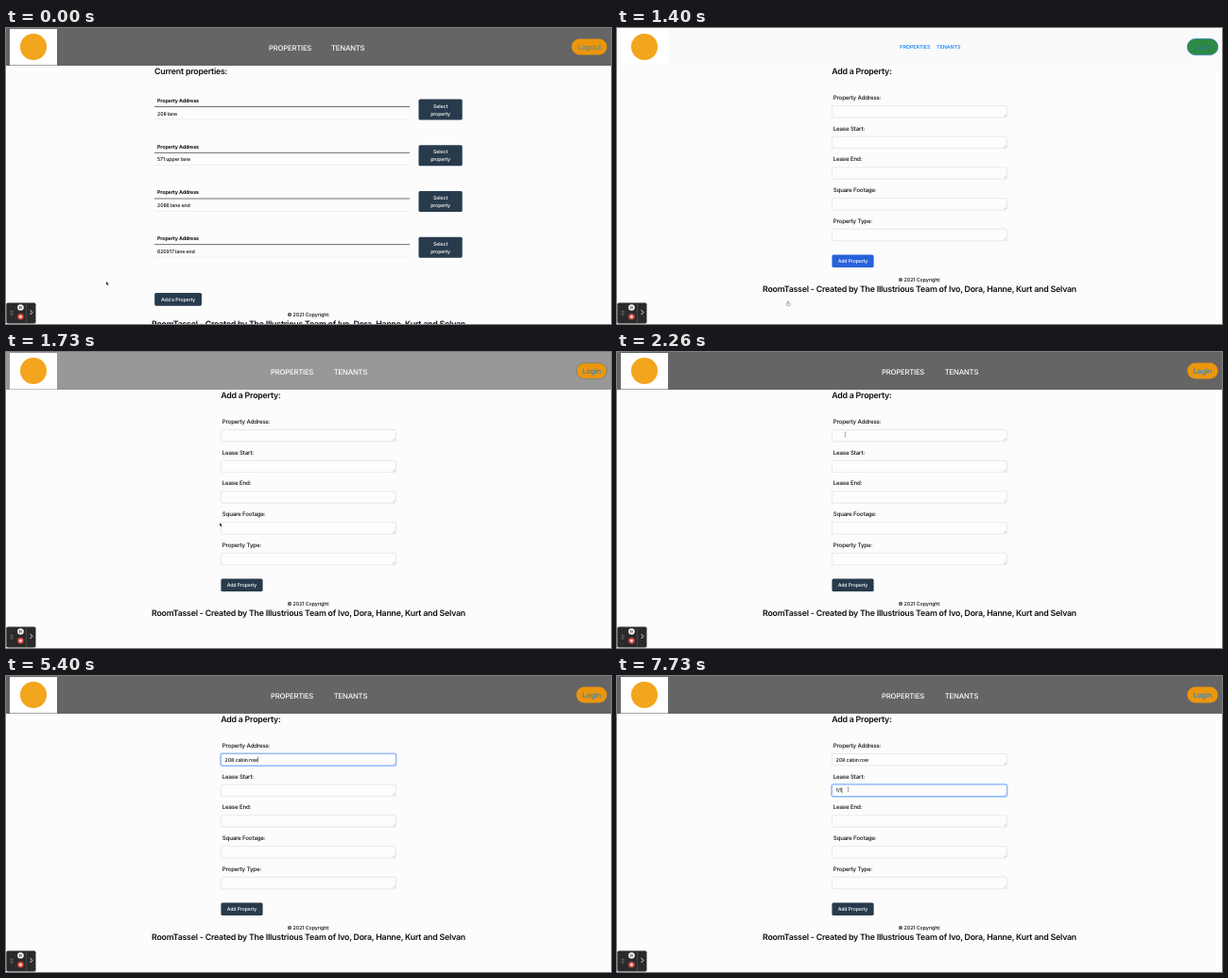
Write an HTML page that moves like this. It is 640 px wide and 314 px high and loops after 8 s.

```html
<!DOCTYPE html>
<html lang="en">
<head>
<meta charset="utf-8">
<title>Add a Property</title>
<style>
  html, body { margin: 0; width: 100%; height: 100%; overflow: hidden; background: #fcfcfd; }
  svg { display: block; width: 640px; height: 314px; }
  text {
    font-family: Inter, "Open Sans", sans-serif; font-weight: 500; letter-spacing: -.025em;
    fill: #0c0e10; white-space: pre; text-rendering: geometricPrecision;
  }
</style>
</head>
<body>
<svg id="stage" viewBox="0 0 640 314"></svg>
<script>
const LOOP = 8000, LOAD = 1400;
const DARK = '#283b4c', ORANGE = '#ec960c';
const stage = document.getElementById('stage');

function add(parent, tag, attrs, content) {
  const node = document.createElementNS('http://www.w3.org/2000/svg', tag);
  for (const k in attrs) node.setAttribute(k, attrs[k]);
  if (content) node.textContent = content;
  parent.appendChild(node);
  return node;
}
const group = parent => add(parent, 'g', {});
const text = (p, x, y, size, str, more) => add(p, 'text', { x, y, 'font-size': size, ...more }, str);
const rect = (p, x, y, width, height, fill, more) => add(p, 'rect', { x, y, width, height, fill, ...more });
const path = (p, d, more) => add(p, 'path', { d, fill: 'none', ...more });
const set = (node, attrs) => { for (const k in attrs) node.setAttribute(k, attrs[k]); };
const show = (node, on) => set(node, { visibility: on ? 'visible' : 'hidden' });
const mid = { 'text-anchor': 'middle' };
const white = { ...mid, style: 'fill:#fff' };
const bold = { style: 'font-weight:600' };

const clamp = v => Math.max(0, Math.min(1, v));
const ease = p => 1 - Math.pow(1 - clamp(p), 2);
function mix(a, b, p) {
  const part = (c, i) => parseInt(c.slice(1 + 2 * i, 3 + 2 * i), 16);
  return 'rgb(' + [0, 1, 2].map(i => Math.round(part(a, i) + (part(b, i) - part(a, i)) * p)) + ')';
}

// Property list page
const list = group(stage);
text(list, 157, 49.2, 8.8, 'Current properties:', bold);
['208 lane', '571 upper lane', '2086 lane end', '620917 lane end'].forEach((address, i) => {
  const y = 48.7 * i;
  text(list, 160, y + 78.9, 5.35, 'Property Address', { style: 'font-weight:700' });
  rect(list, 157, y + 83.2, 270, 0.8, '#4a4d50');
  text(list, 160, y + 92.6, 5.3, address);
  rect(list, 157, y + 96.7, 270, 0.5, '#dcdfe3');
  rect(list, 436.5, y + 75.6, 46.2, 22, DARK, { rx: 1.6 });
  text(list, 459.6, y + 84.6, 5.3, 'Select', white);
  text(list, 459.6, y + 92.6, 5.3, 'property', white);
});
rect(list, 157.2, 281, 49.8, 13.7, DARK, { rx: 1.6 });
text(list, 182.1, 289.8, 5.3, 'Add a Property', white);

// Form page
const form = group(stage);
text(form, 227.2, 49.2, 8.8, 'Add a Property:', bold);
const labels = ['Property Address:', 'Lease Start:', 'Lease End:', 'Square Footage:', 'Property Type:'];
const fields = labels.map((label, i) => {
  const y = 82.4 + 32.7 * i;
  text(form, 228.7, y - 6.5, 6.15, label);
  const glow = rect(form, 226.9, y - 0.3, 186, 13.2, 'none', { rx: 1.8, stroke: '#9cc3fb', 'stroke-width': 1.3 });
  const box = rect(form, 227.4, y + 0.1, 185, 12.4, '#fdfdfe', { rx: 1.4, 'stroke-width': 0.55 });
  path(form, `M409.3 ${y + 11.6}l2.2-2.2M410.6 ${y + 11.6}l.9-.9`, { stroke: '#777', 'stroke-width': 0.35 });
  const value = text(form, 231.6, y + 8.3, 5.3, '');
  return { y, glow, box, value };
});
const caret = rect(form, 0, 0, 0.5, 6, '#111');
const submit = rect(form, 227.4, 240.4, 44.2, 13.6, DARK, { rx: 1.6 });
text(form, 249.5, 249, 5.2, 'Add Property', white);

// Footer shared by both pages
const footer = group(stage);
text(footer, 320, 269, 5.4, '© 2021 Copyright:', mid);
text(footer, 320, 280.3, 8.8, 'RoomTassel - Created by The Illustrious Team of Ivo, Dora, Hanne, Kurt and Selvan',
  { ...mid, ...bold });

// Navigation bar
const bar = rect(stage, 0, 0, 640, 40, '#666666');
rect(stage, 4, 1, 50, 38.4, '#fff');
add(stage, 'circle', { cx: 29, cy: 20, r: 14, fill: '#f3a51d' });
const links = ['PROPERTIES', 'TENANTS'].map(s => text(stage, 0, 0, 7.7, s));
const pill = rect(stage, 603.3, 11.6, 32.4, 17, ORANGE, { rx: 8.5, stroke: '#2a78b0', 'stroke-width': 0.8 });
const account = text(stage, 0, 22.7, 7.7, '', mid);

// Screen recorder controls
const rec = group(stage);
rect(rec, 0.3, 291.6, 31.2, 21.8, '#2a2a2b', { rx: 1.6 });
for (let i = 0; i < 6; i++)
  rect(rec, 4.7 + (i % 2) * 1.8, 300 + (i >> 1) * 1.9, 0.8, 0.8, '#bbb');
add(rec, 'circle', { cx: 15.4, cy: 296.5, r: 3.3, fill: '#fff' });
path(rec, 'M14.6 295.1v2.8M16.2 295.1v2.8', { stroke: '#222', 'stroke-width': 0.8 });
add(rec, 'circle', { cx: 15.4, cy: 306.2, r: 3.3, fill: '#d9483f' });
rect(rec, 14.2, 305, 2.4, 2.4, '#fff', { rx: 0.5 });
rect(rec, 21.1, 292.5, 0.5, 20.4, '#606060');
path(rec, 'M25.6 299.2l2.3 2.4-2.3 2.4', { stroke: '#fff', 'stroke-width': 0.9 });

// Pointers, drawn around their hot spot
const pointers = {
  arrow: path(stage, 'M0 0V4.1L.95 3.3 1.6 4.8 2.3 4.5 1.65 3.1H2.9Z',
    { style: 'fill:#111', stroke: '#fff', 'stroke-width': 0.3 }),
  hand: path(stage, 'M-.5.4Q0-.3.5.4V2L2 2.4Q2.4 2.6 2.3 3.4L1.7 5.1H-.8L-2.1 3.2Q-1.7 2.4-.5 3.2Z',
    { style: 'fill:#fff', stroke: '#555', 'stroke-width': 0.45 }),
  beam: path(stage, 'M-.8-2.6Q0-2.6 0-2Q0-2.6.8-2.6M0-2V2M-.8 2.6Q0 2.6 0 2Q0 2.6.8 2.6',
    { stroke: '#555', 'stroke-width': 0.45 })
};
const route = [
  [60, 106, 268.7], [660, 181, 288], [1000, 181, 288], [1260, 181, 289.6], [1460, 181, 289.6],
  [1730, 226, 180.9], [2200, 241.4, 87.5], [2460, 241.4, 87.5], [3000, 244, 88.2],
  [5800, 244, 88.2], [6400, 244.5, 120.4]
];
function pointerAt(t) {
  const i = route.findIndex(k => k[0] > t);
  if (i < 0) return route[route.length - 1].slice(1);
  if (i === 0) return route[0].slice(1);
  const [t0, x0, y0] = route[i - 1], [t1, x1, y1] = route[i];
  const p = (t - t0) / (t1 - t0), s = p * p * (3 - 2 * p);
  return [x0 + (x1 - x0) * s, y0 + (y1 - y0) * s];
}

const entries = [
  { focus: 2460, str: '208 cabin row',
    keys: [3400, 3600, 3660, 3860, 4000, 4060, 4200, 4330, 4460, 4600, 4800, 5060, 5200] },
  { focus: 6400, str: '1/1', keys: [7060, 7200, 7400] }
];

function drawNav(t, onForm) {
  const age = t - LOAD, raw = onForm && age < 60;
  const fade = onForm ? ease(age / 800) : 1;
  const quick = onForm ? ease(age / 320) : 1;
  set(bar, { fill: mix('#fafafa', '#656565', fade) });
  const xs = raw ? [299, 338] : onForm ? [280, 346.8] : [278, 344];
  links.forEach((link, i) => {
    set(link, { x: xs[i], y: raw ? 21.9 : 23.7, 'font-size': raw ? 5.5 : 7.7 });
    link.style.fill = raw ? '#1680f0' : '#fff';
  });
  set(pill, {
    x: onForm ? 603.3 : 598.3, width: onForm ? 32.4 : 37.4,
    fill: mix('#2c8a42', ORANGE, quick),
    'stroke-opacity': onForm ? clamp(1 - age / 800) : 0
  });
  account.textContent = onForm ? 'Login' : 'Logout';
  set(account, { x: onForm ? 619.5 : 617.2 });
  account.style.fill = onForm ? mix('#2a7d78', '#2585d2', quick) : '#4b8fa6';
  set(submit, { fill: mix('#2862dc', DARK, ease(age / 200)) });
}

function drawFields(t) {
  const active = t < entries[0].focus ? -1 : t < entries[1].focus ? 0 : 1;
  fields.forEach((f, i) => {
    const e = entries[i];
    let lit = 0;
    if (e) {
      f.value.textContent = e.str.slice(0, e.keys.filter(k => k <= t).length);
      lit = ease((t - e.focus) / 150);
      if (i === 0) lit -= ease((t - entries[1].focus) / 150);
    }
    set(f.glow, { opacity: clamp(lit) });
    set(f.box, { stroke: mix('#d3d7dc', '#5794ee', clamp(lit)) });
  });
  let on = false;
  if (active >= 0) {
    const e = entries[active], f = fields[active];
    const last = Math.max(e.focus, ...e.keys.filter(k => k <= t));
    on = Math.floor((t - last) / 500) % 2 === 0;
    const width = f.value.textContent ? f.value.getComputedTextLength() : 0;
    set(caret, { x: 231.7 + width, y: f.y + 3.3 });
  }
  show(caret, on);
}

function drawPointer(t, onForm) {
  const [x, y] = pointerAt(t);
  const inField = onForm && x > 227 && x < 413 && fields.some(f => y > f.y && y < f.y + 12.6);
  const onButton = t < LOAD + 60 && x > 157 && x < 207 && y > 281 && y < 295;
  const kind = inField ? 'beam' : onButton ? 'hand' : 'arrow';
  const hidden = t >= 3860 && t < 5800;
  for (const k in pointers) {
    show(pointers[k], k === kind && !hidden);
    set(pointers[k], { transform: `translate(${x} ${y})` });
  }
}

function render(t) {
  const onForm = t >= LOAD;
  set(list, { display: onForm ? 'none' : 'inline' });
  set(form, { display: onForm ? 'inline' : 'none' });
  set(footer, { transform: `translate(0 ${onForm ? 0 : 37.2})` });
  drawNav(t, onForm);
  if (onForm) drawFields(t);
  else show(caret, false);
  drawPointer(t, onForm);
}

const start = performance.now();
function tick() {
  render((performance.now() - start) % LOOP);
  requestAnimationFrame(tick);
}
tick();
</script>
</body>
</html>
```
